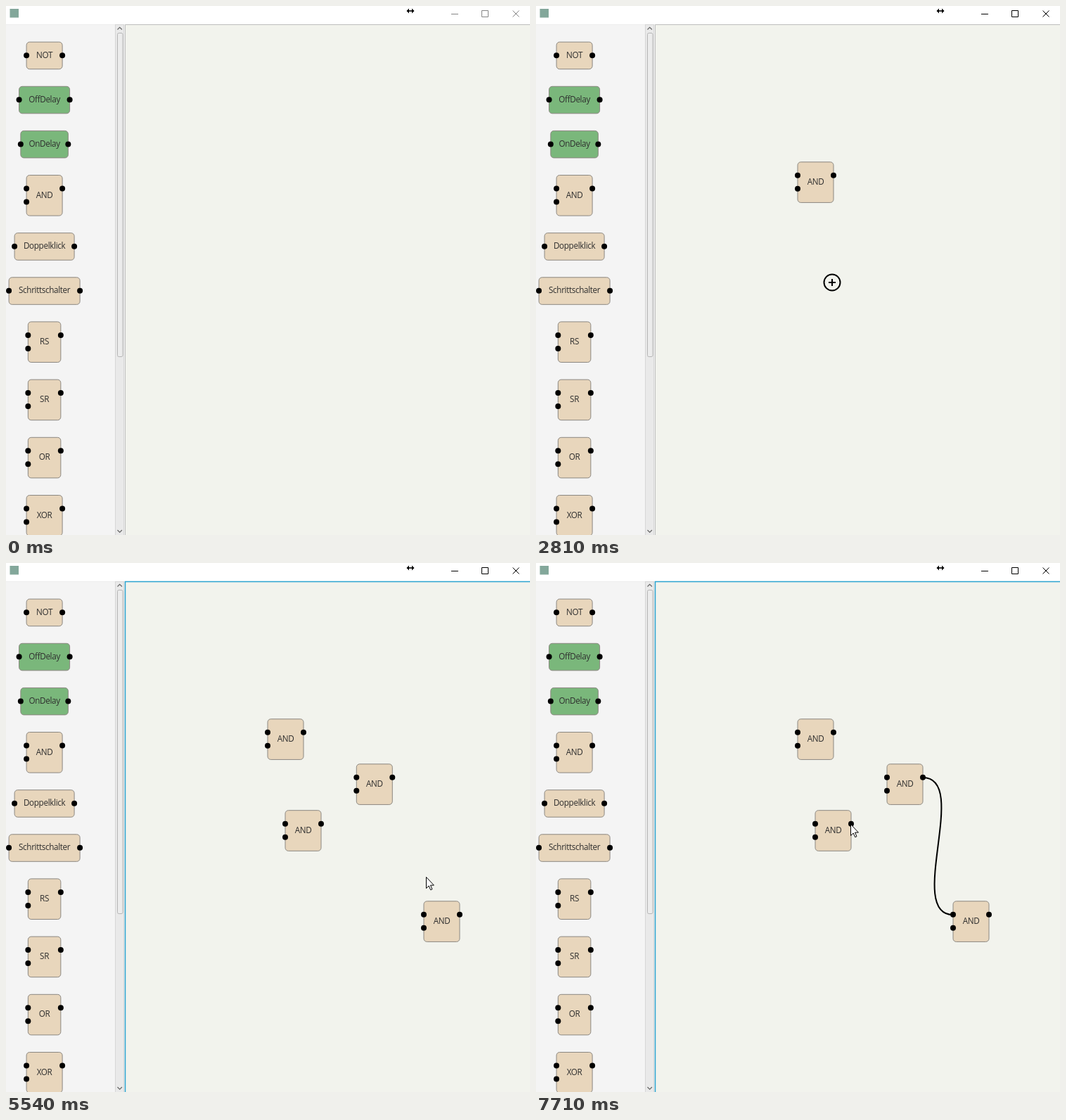
These frames come from a looping animation (745x752 px, 7990 ms). An HTML page:

```html
<!DOCTYPE html>
<html lang="de">
<head>
<meta charset="utf-8">
<title>Logic block editor</title>
<style>
html, body { margin: 0; width: 100%; height: 100%; overflow: hidden; background: #fff; }
svg { display: block; }
text { font: 11.7px "Open Sans", "Noto Sans", sans-serif; letter-spacing: -0.35px; fill: #2e2e2e; text-anchor: middle; }
.box { stroke: #8b8781; }
</style>
</head>
<body>
<svg width="745" height="752" viewBox="0 0 745 752">
  <rect width="745" height="752" fill="#fff"/>
  <rect x="5.5" y="4" width="12.5" height="12.5" fill="#83a79a"/>
  <path d="M571 7h8" stroke="#000" stroke-width="1.6"/>
  <path d="M569.5 7l3.5-3.5v7zM580.5 7l-3.5-3.5v7z"/>
  <path id="buttons" d="M633 11.5h10M676.5 6.5h9v9h-9zM720.5 6.5l9 9M729.5 6.5l-9 9" fill="none"/>

  <rect y="26" width="169" height="726" fill="#f4f4f4"/>
  <path d="M0 26.5h169" stroke="#ececec"/>
  <rect x="155.5" y="26.5" width="12" height="726" fill="#e9e9e9" stroke="#d6d6d6"/>
  <rect x="158.5" y="38.5" width="7.5" height="460" rx="2" fill="#ececec" stroke="#b5b5b5"/>
  <path d="M158.5 33.5l3.2-3.2 3.2 3.2M158.5 745l3.2 3.2 3.2-3.2" fill="none" stroke="#666" stroke-width="1.2"/>

  <rect x="169" y="26" width="576" height="726" fill="#f2f3ed"/>
  <path id="border" d="M169.5 752V26.5H745" fill="none"/>
  <g id="palette"></g>
  <g id="canvas"></g>
  <path id="wire" fill="none" stroke="#000" stroke-width="2"/>
  <path id="arrow" d="M.5 .5v16l3.7-3.5 2.5 5.7 2.3-1-2.5-5.6h4.9z" fill="#fff" stroke="#000"/>
  <g id="plus" fill="none" stroke="#000" stroke-width="2">
    <circle r="11.5"/><path d="M-5 0H5M0-5V5"/>
  </g>
</svg>
<script>
const LOOP = 7990, TAN = '#e8d6bc', GREEN = '#7ab77b';
const GAP = 24.6, PORT = 19, AND_W = 51, TALL = 57.6, FLAT = 38.5;
const $ = id => document.getElementById(id);
const place = (el, x, y) => el.setAttribute('transform', `translate(${x} ${y})`);
const show = (el, on) => el.setAttribute('visibility', on ? 'visible' : 'hidden');
const ease = p => p * p * (3 - 2 * p);

function block(parent, name, w, h, fill = TAN) {
  const dot = (x, y) => `<circle cx="${x}" cy="${y}" r="4"/>`;
  const g = document.createElementNS('http://www.w3.org/2000/svg', 'g');
  g.innerHTML = `<rect class="box" width="${w}" height="${h}" rx="4.5" fill="${fill}"/>` +
    dot(0, PORT) + dot(w, PORT) + (h === TALL ? dot(0, 2 * PORT) : '') +
    `<text x="${w / 2}" y="${h / 2 + 3.4}">${name}</text>`;
  parent.append(g);
  return g;
}

let rowY = 51.2;
function row(name, w, h, fill) {
  place(block($('palette'), name, w, h, fill), 54.6 - w / 2, rowY);
  rowY += h + GAP;
}
row('NOT', AND_W, FLAT);
row('OffDelay', 72, FLAT, GREEN);
row('OnDelay', 67.5, FLAT, GREEN);
row('AND', AND_W, TALL);
row('Doppelklick', 85, FLAT);
row('Schrittschalter', 101, FLAT);
for (const name of ['RS', 'SR', 'OR']) row(name, 46.5, TALL);
row('XOR', AND_W, TALL);

// Each trip grabs the palette's AND at `grab` and drops a copy at x, y.
const trips = [
  { start: 1250, drop: 1620, grab: 49, x: 372, y: 221.8 },
  { start: 2400, drop: 2850, grab: 62, x: 397, y: 351.7, via: [2620, 400, 545] },
  { start: 3370, drop: 3950, grab: 45, x: 498.3, y: 285.8, via: [3830, 551, 347] },
  { start: 4900, drop: 5270, grab: 35, x: 594, y: 480.8, via: [5000, 492, 398] }
];
const REST = 260, GRAB_Y = 256;
const [, , from, to] = trips;

// Clicking two ports nudges their blocks and then joins them.
Object.assign(from, { click: 6050, dx: 0.7 });
Object.assign(to, { click: 7040, dx: -1 });
const out = [Math.round(from.x + from.dx + AND_W), Math.round(from.y + PORT)];
const into = [to.x + to.dx, Math.round(to.y + PORT)];

const stops = [[30, 520, 750], [230, 185, 560], [560, 5, 40], [790, 83, 344], [840, 83, 344]];
for (const trip of trips) {
  const { start, drop, grab, x, y, via } = trip;
  trip.el = block($('canvas'), 'AND', AND_W, TALL);
  stops.push([start - REST, grab, GRAB_Y], [start, grab, GRAB_Y]);
  if (via) stops.push(via);
  stops.push([drop, x + AND_W / 2, y + TALL / 2]);
}
stops.push([5690, 588, 420], [5930, ...out], [from.click, ...out], [6330, 577, 454],
  [6740, ...into], [to.click, ...into], [7450, 414, 385], [7710, 447, 371]);

function pointer(t) {
  const next = stops.findIndex(s => s[0] > t);
  if (next < 1) return (next ? stops[stops.length - 1] : stops[0]).slice(1);
  const [t0, x0, y0] = stops[next - 1], [t1, x1, y1] = stops[next];
  const p = ease((t - t0) / (t1 - t0));
  return [x0 + (x1 - x0) * p, y0 + (y1 - y0) * p].map(Math.round);
}

function link([x0, y0], [x1, y1], bend) {
  return `M${x0} ${y0}C${x0 + bend} ${y0} ${x1 - bend} ${y1} ${x1} ${y1}`;
}
$('wire').setAttribute('d', link(out, into, 68));

function draw(t) {
  const [x, y] = pointer(t);
  const dragging = trips.some(s => t >= s.start && t < s.drop);
  const focused = trips.some((s, i) =>
    t >= s.drop && t < (trips[i + 1]?.start ?? LOOP + REST) - REST / 2);
  place($('arrow'), x, y);
  place($('plus'), x, y);
  show($('arrow'), t >= stops[0][0] && !dragging);
  show($('plus'), dragging);
  for (const s of trips) {
    show(s.el, t >= s.drop);
    place(s.el, s.x + (t >= s.click ? s.dx : 0), s.y);
  }
  show($('wire'), t >= to.click);
  $('buttons').setAttribute('stroke', t >= 1050 ? '#000' : '#858585');
  $('border').setAttribute('stroke', focused ? '#2ba3d0' : '#bdbdbd');
  $('border').setAttribute('stroke-width', focused ? 1.5 : 1);
}

function tick() {
  draw(performance.now() % LOOP);
  requestAnimationFrame(tick);
}
tick();
</script>
</body>
</html>
```
